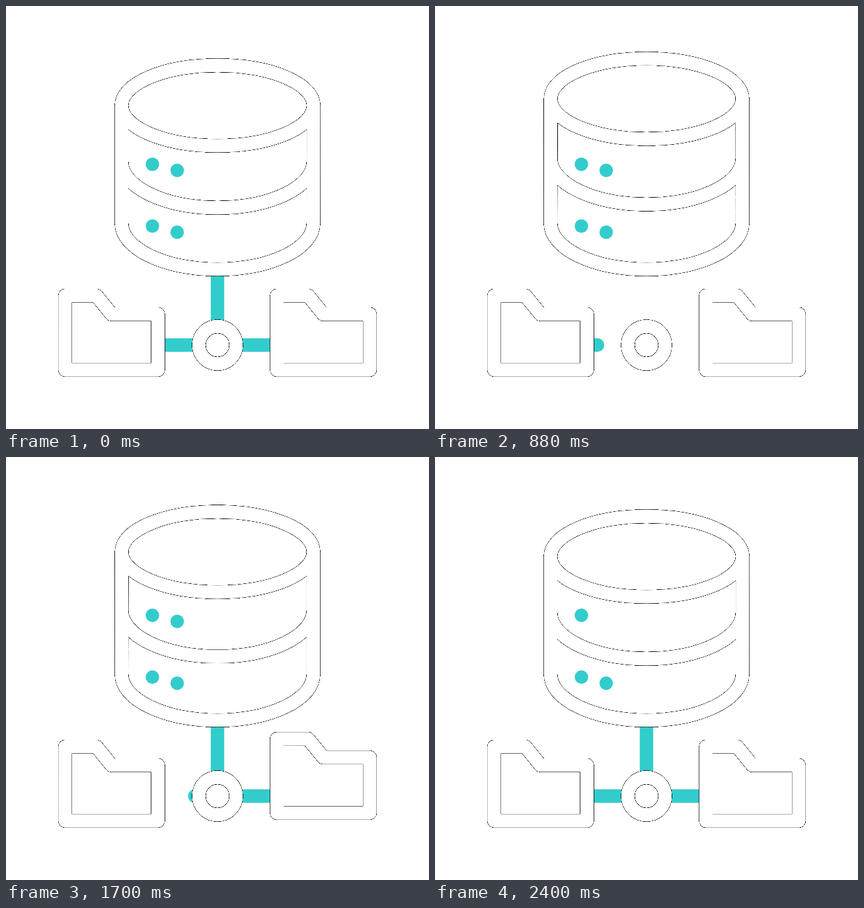
Animation of 640x640 px, one loop 2.42 s. Source, as an HTML page:

```html
<!DOCTYPE html>
<html lang="en">
<head>
<meta charset="utf-8">
<title>Shared database</title>
<style>
  html, body { margin: 0; width: 100%; height: 100%; overflow: hidden; background: #fff; }
  svg { display: block; width: 100vw; height: 100vh; }
  .band { fill: none; stroke: #fff; stroke-width: 20.4; stroke-linejoin: round; }
  .bar { fill: none; stroke: #3cc; stroke-width: 20.4; stroke-linecap: round; }
  .dot { fill: #3cc; }
</style>
</head>
<body>
<svg viewBox="0 0 640 640">
  <defs>
    <!-- Darkens only the partly covered pixels along the rim of the white bands. -->
    <filter id="rim" filterUnits="userSpaceOnUse" x="0" y="0" width="640" height="640" color-interpolation-filters="sRGB">
      <feColorMatrix in="SourceGraphic" values="0 0 0 0 0  0 0 0 0 0  0 0 0 0 0  0 0 0 1 0"/>
      <feComponentTransfer result="line">
        <feFuncA type="table" tableValues="0 1 .9 .76 .62 .48 .32 .16 0"/>
      </feComponentTransfer>
      <feMerge>
        <feMergeNode in="SourceGraphic"/>
        <feMergeNode in="line"/>
      </feMerge>
    </filter>
    <path id="folder" class="band" d="M89.400 438.300H136.800L159.600 466.300H230.100V550.500H89.400Z"/>
  </defs>

  <path id="down" class="bar"/>
  <path id="right" class="bar"/>
  <path id="left" class="bar"/>
  <circle id="disc" cx="320" cy="513" fill="#fff"/>

  <g filter="url(#rim)">
    <path id="drum" class="band"/>
    <circle id="ring" class="band" cx="320" cy="513"/>
    <use id="folderL" href="#folder"/>
    <use id="folderR" href="#folder"/>
  </g>

  <circle class="dot" cx="221.500" cy="239.500" r="10.200"/>
  <circle id="blink" class="dot" cx="259" cy="248.700" r="10.200"/>
  <circle class="dot" cx="221.500" cy="333" r="10.200"/>
  <circle class="dot" cx="259" cy="342.300" r="10.200"/>
</svg>
<script>
const LOOP = 2420;
const REACH = 88;
const el = id => document.getElementById(id);
const set = (id, name, value) => el(id).setAttribute(name, value);

const lin = (t, a, b) => Math.min(1, Math.max(0, (t - a) / (b - a)));
const ease = (t, a, b) => { const u = lin(t, a, b); return u * u * (3 - 2 * u); };
const bump = (t, a, half) => ease(t, a, a + half) - ease(t, a + half, a + 2 * half);

// A bar between two positions; empty once it has shrunk away.
function bar(id, from, to, path) {
  set(id, 'd', to - from > 0.5 ? path(from, to) : '');
}

function drawDrum(lift) {
  const top = 150.6 - lift;
  const mid = 235.3 - lift / 2;
  const l = 174.8 + 0.02 * lift;
  const r = 465.33 - 0.02 * lift;
  const rx = (r - l) / 2;
  set('drum', 'd',
    `M${l} ${top}A${rx} 60.8 0 0 1 ${r} ${top}A${rx} 60.8 0 0 1 ${l} ${top}` +
    `L174.8 328.4A145.2 70 0 0 0 465.2 328.4L${r} ${top}` +
    `M174.8 ${mid}A145.2 70 0 0 0 465.2 ${mid}`);
}

function drawBars(t) {
  const growing = t > 1090;
  const downTip = growing ? 398 + 77 * ease(t, 1120, 1450) : 490;
  const downTail = growing ? 398 : 398 + 92 * ease(t, 100, 450);
  bar('down', downTail, downTip, (a, b) => `M320 ${a}V${b}`);

  const rightTip = growing ? REACH * ease(t, 1400, 1600) : REACH;
  const rightTail = growing ? 0 : 100 * ease(t, 330, 850);
  bar('right', rightTail, rightTip, (a, b) => `M${320 + a} 513H${320 + b}`);

  const leftTip = growing ? REACH * ease(t, 1590, 1850) : REACH;
  const leftTail = growing ? 0 : 95 * lin(t, 216, 1068);
  bar('left', leftTail, leftTip, (a, b) => `M${320 - a} 513H${320 - b}`);
}

function draw(t) {
  drawDrum(11.1 * (ease(t, 0, 1070) - ease(t, 1240, 2340)));
  drawBars(t);
  const radius = 28.2 + 4.6 * bump(t, 1240, 160);
  set('ring', 'r', radius);
  set('disc', 'r', radius);
  set('folderR', 'transform', `translate(320.4 ${-15 * bump(t, 1560, 200)})`);
  set('folderL', 'transform', `translate(0 ${-15 * bump(t, 1798, 200)})`);
  set('blink', 'visibility', t >= 2390 ? 'hidden' : 'visible');
}

const start = performance.now();
function frame(now) {
  draw(Math.max(0, now - start) % LOOP);
  requestAnimationFrame(frame);
}
draw(0);
requestAnimationFrame(frame);
</script>
</body>
</html>
```
